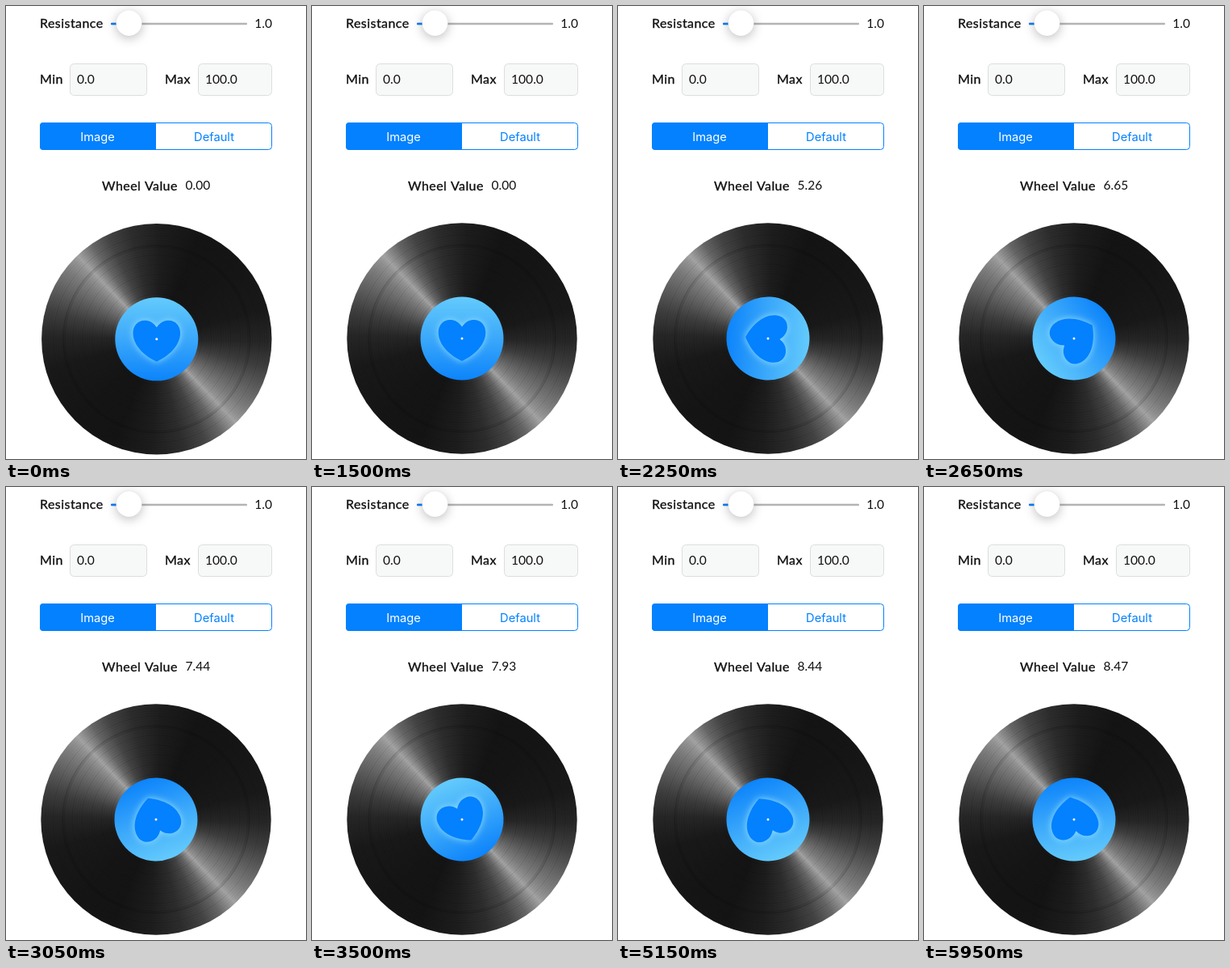
An HTML page with a canvas for the animation above (6 s loop, 372x560 px).

```html
<!DOCTYPE html>
<html lang="en">
<head>
<meta charset="utf-8">
<title>Wheel control</title>
<style>
html, body { margin: 0; width: 100%; height: 100%; overflow: hidden; background: #fff; }
canvas { display: block; width: 372px; height: 560px; }
</style>
</head>
<body>
<canvas id="stage" width="372" height="560"></canvas>
<script>
const ctx = document.getElementById('stage').getContext('2d');
const LOOP = 6000, STEP = 50, TAU = Math.PI * 2;
const BLUE = '#0381fe', INK = '#111';
const CX = 186, CY = 411, DISC_R = 142.7, LABEL_R = 51.5;

// Turns of the wheel: a short push, then exponential slowing.
function wheelValue(ms) {
  const coast = s => 8.49 - 3.23 * Math.exp(-1.407 * (s - 2.25));
  const s = ms / 1000;
  if (s <= 1.5) return 0;
  if (s < 1.6) return coast(1.6) * ((s - 1.5) / 0.1) ** 2;
  return coast(s);
}

function text(str, x, y, size, { color = INK, align = 'left', family = 'Lato', spacing = 0 } = {}) {
  ctx.font = `400 ${size}px ${family}, sans-serif`;
  ctx.letterSpacing = `${spacing}px`;
  ctx.fillStyle = color;
  ctx.textAlign = align;
  ctx.fillText(str, x, y);
}

// Medium weight: regular letters with a hairline outline.
function caption(str, x, y) {
  text(str, x, y, 16, { spacing: 0.45 });
  ctx.strokeStyle = INK;
  ctx.lineWidth = 0.35;
  ctx.strokeText(str, x, y);
}

function circle(x, y, r) {
  ctx.beginPath();
  ctx.arc(x, y, r, 0, TAU);
}

function box(x, y, w, h, r, fill, stroke) {
  ctx.beginPath();
  ctx.roundRect(x, y, w, h, r);
  if (fill) { ctx.fillStyle = fill; ctx.fill(); }
  if (stroke) { ctx.strokeStyle = stroke; ctx.lineWidth = 1; ctx.stroke(); }
}

function withShadow(color, blur, dy, draw) {
  ctx.save();
  ctx.shadowColor = color;
  ctx.shadowBlur = blur;
  ctx.shadowOffsetY = dy;
  draw();
  ctx.restore();
}

function slider() {
  caption('Resistance', 42, 26.5);
  box(130, 20.7, 169, 2.6, 1, '#b4b4b5');
  box(130, 20.7, 22, 2.6, 1, BLUE);
  withShadow('rgba(0,0,0,.25)', 13, 3, () => {
    circle(152.5, 21, 16);
    ctx.fillStyle = '#fff';
    ctx.fill();
  });
  circle(152.5, 21, 16);
  ctx.strokeStyle = 'rgba(0,0,0,.06)';
  ctx.lineWidth = 0.7;
  ctx.stroke();
  text('1.0', 330, 26.5, 15.5, { align: 'right' });
}

function field(name, nameX, x, w, value) {
  caption(name, nameX, 96.3);
  box(x, 71.5, w, 39, 5, '#f7f8f8', '#dcdddd');
  text(value, x + 8.5, 96.3, 15.6);
}

function segments() {
  box(42.5, 144.5, 287, 33, 4, '#fff', BLUE);
  box(42, 144, 144, 34, [4, 0, 0, 4], BLUE);
  text('Image', 113.5, 166.5, 14.7, { color: '#fff', align: 'center', family: 'Inter' });
  text('Default', 258, 166.5, 14.7, { color: BLUE, align: 'center', family: 'Inter' });
}

// Grey level by signed angle from the bright line, in degrees; repeats each half turn.
const SHEEN = [
  [-90, 21], [-62, 25], [-45, 38], [-32, 62], [-20, 94], [-9, 124], [-3, 146], [0, 163],
  [3, 142], [9, 102], [18, 68], [30, 45], [46, 29], [66, 20], [90, 21]
];

function sheenGradient() {
  const line = 46.5;
  const g = ctx.createConicGradient((line - 90) / 360 * TAU, 0, 0);
  for (const half of [0, 180]) {
    for (const [deg, level] of SHEEN) {
      g.addColorStop((half + deg + 90) / 360, `rgb(${level},${level},${level})`);
    }
  }
  return g;
}

function disc() {
  circle(0, 0, DISC_R);
  ctx.fillStyle = sheenGradient();
  ctx.fill();
  for (let r = 56, i = 0; r < 140; r += 3, i++) {
    circle(0, 0, r);
    ctx.lineWidth = 0.8;
    ctx.strokeStyle = `rgba(0,0,0,${i % 4 ? 0.06 : 0.14})`;
    ctx.stroke();
  }
  circle(0, 0, 115);
  ctx.lineWidth = 4;
  ctx.strokeStyle = 'rgba(0,0,0,.09)';
  ctx.stroke();
}

function heartPath() {
  ctx.beginPath();
  ctx.moveTo(0, -14.5);
  ctx.bezierCurveTo(4, -20.5, 9, -23, 15, -23);
  ctx.bezierCurveTo(23.5, -23, 29.3, -16.5, 29.3, -7.5);
  ctx.bezierCurveTo(29.3, 8, 15, 21, 0, 28);
  ctx.bezierCurveTo(-15, 21, -29.3, 8, -29.3, -7.5);
  ctx.bezierCurveTo(-29.3, -16.5, -23.5, -23, -15, -23);
  ctx.bezierCurveTo(-9, -23, -4, -20.5, 0, -14.5);
  ctx.closePath();
}

function label(turns) {
  ctx.save();
  ctx.rotate(turns * TAU);
  const g = ctx.createLinearGradient(0, -LABEL_R, 0, LABEL_R);
  g.addColorStop(0, '#64cbfc');
  g.addColorStop(0.5, '#3ba8fa');
  g.addColorStop(1, '#0c84fb');
  circle(0, 0, LABEL_R);
  ctx.fillStyle = g;
  ctx.fill();
  heartPath();
  ctx.fillStyle = BLUE;
  withShadow('rgba(150,225,255,1)', 8, 0, () => ctx.fill());
  ctx.restore();
  circle(0, 0, 1.5);
  ctx.fillStyle = '#fff';
  ctx.fill();
}

function draw(ms) {
  const value = wheelValue(ms);
  ctx.fillStyle = '#fff';
  ctx.fillRect(0, 0, 372, 560);
  slider();
  field('Min', 42, 79.5, 95, '0.0');
  field('Max', 197, 238.5, 91, '100.0');
  segments();
  caption('Wheel Value', 119, 227.5);
  text(value.toFixed(2), 222.5, 227.3, 15.5);

  const settle = 0.8 * Math.max(0, 1 - ms / 200);
  ctx.save();
  ctx.translate(CX + settle, CY + settle);
  disc();
  label(value);
  ctx.restore();
}

function tick() {
  const ms = performance.now() % LOOP;
  draw(Math.floor(ms / STEP) * STEP);
  requestAnimationFrame(tick);
}
tick();
</script>
</body>
</html>
```
